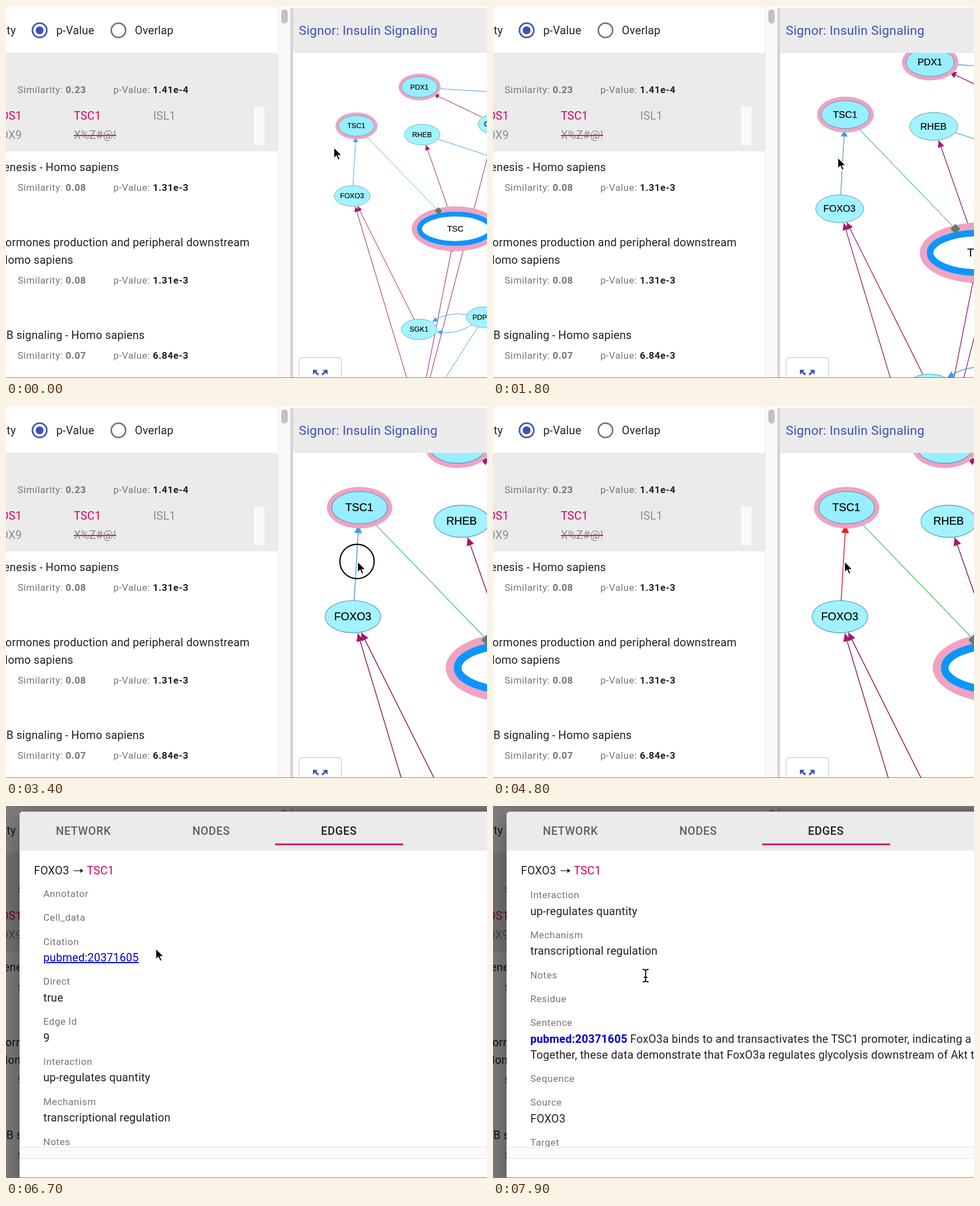
Animation of 851x658 px, one loop 8000 ms. Source, as an HTML page:

```html
<!DOCTYPE html>
<html lang="en">
<head>
<meta charset="utf-8">
<style>
html, body { margin: 0; width: 100%; height: 100%; overflow: hidden; background: #fff; }
svg { display: block; width: 851px; height: 658px; }
text { font: 19.78px Roboto, sans-serif; letter-spacing: .01071em; fill: #212121; white-space: pre; }
.end { text-anchor: end; }
.small { font-size: 16.95px; letter-spacing: .0333em; fill: #757575; }
.small tspan { font-weight: 700; }
.dark { fill: #212121; }
.head { font-size: 22.6px; letter-spacing: .00938em; fill: #3f51b5; }
.pink { fill: #d90057; }
.grey { fill: #8c8c8c; }
.link { fill: #0000cd; text-decoration: underline; }
.bold { fill: #0000cd; font-weight: 700; }
.tab { font-weight: 500; letter-spacing: .02857em; text-anchor: middle; fill: #5f5f5f; }
.on { fill: #212121; }
#graph text { font: 12.5px "Liberation Sans", Arial, sans-serif; letter-spacing: 0; text-anchor: middle; fill: #000; stroke: #000; stroke-width: .15; }
#graph .big { font-size: 14.5px; }
</style>
</head>
<body>
<svg viewBox="0 0 851 658">
  <defs>
    <clipPath id="view"><rect x="508" y="83" width="343" height="575"/></clipPath>
    <clipPath id="page"><rect x="24" y="145" width="827" height="458"/></clipPath>
    <path id="beamPath" d="M-4.5 -11Q0 -11 0 -8V8Q0 11 -4.5 11M4.5 -11Q0 -11 0 -8M0 8Q0 11 4.5 11M-2.5 3H2.5"/>
  </defs>
  <g id="panel"></g>
  <g clip-path="url(#view)"><g id="graph"></g></g>
  <g id="button">
    <rect x="518.5" y="622" width="75" height="60" rx="5" fill="#fff" stroke="#d0d0d0" stroke-width="1.4"/>
    <path fill="#3f51b5" d="M543 643.5h8.5l-2.8 2.8 5 5-2.2 2.2-5-5-3.5 3.5zM569 643.5h-8.5l2.8 2.8-5 5 2.2 2.2 5-5 3.5 3.5z"/>
  </g>
  <g id="dialog">
    <rect width="851" height="658" opacity=".5"/>
    <rect x="24" y="10" width="900" height="800" rx="5.6" fill="#fff" style="filter:drop-shadow(0 13px 24px rgba(0,0,0,.4))"/>
    <path d="M24 79V15.6a5.6 5.6 0 0 1 5.6-5.6H851V79z" fill="#ebebeb"/>
    <rect x="476" y="66.4" width="226.5" height="2.9" fill="#d90057"/>
    <path d="M24 603h827v20.5H24z" fill="#fafafa"/>
    <path d="M24 603.5h827M24 623.5h827" stroke="#e0e0e0"/>
    <path d="M119.5 114.5H133" stroke="#212121" stroke-width="1.3"/>
    <path d="M131.5 110.5l5.5 4-5.5 4z" fill="#212121"/>
    <g id="tabs"></g>
    <g clip-path="url(#page)"><g id="fields"></g></g>
  </g>
  <path d="M0 657.5H851" stroke="#808080"/>
  <circle id="ring" cx="621" cy="275" r="30.3" fill="none" stroke="#000" stroke-width="2.2"/>
  <g id="cursor">
    <path id="arrow" transform="scale(1.12)" d="M0 0V17.5L4 13.7 6.8 20 9.7 18.7 7 12.6H12.5Z" stroke="#fff" stroke-width="1.3"/>
    <g id="beam" fill="none" stroke-linecap="round">
      <use href="#beamPath" stroke="#fff" stroke-width="4"/>
      <use href="#beamPath" stroke="#000" stroke-width="1.8"/>
    </g>
  </g>
</svg>
<script>
const $ = id => document.getElementById(id);
const text = (x, y, s, cls = '') => `<text x="${x}" y="${y}" class="${cls}">${s}</text>`;
const rect = (x, y, w, h, fill, rx = 0) =>
  `<rect x="${x}" y="${y}" width="${w}" height="${h}" fill="${fill}" rx="${rx}"/>`;
const radio = (x, color) =>
  `<circle cx="${x}" cy="43" r="12.7" fill="none" stroke="${color}" stroke-width="2.8"/>`;
const scores = (y, similarity, p) =>
  text(20.5, y, `Similarity: <tspan>${similarity}</tspan>`, 'small') +
  text(190, y, `p-Value: <tspan class="dark">${p}</tspan>`, 'small');

$('panel').innerHTML =
  rect(0, 0, 851, 4, '#fafafa') + rect(0, 83, 482, 174, '#ebebeb') +
  rect(439, 178, 18.5, 68, '#fafafa') +
  rect(481.5, 0, 22, 658, '#fafafa') + rect(481.5, 0, 1, 658, '#e6e6e6') +
  rect(487, 6, 11.5, 25, '#c1c1c1', 5.7) +
  rect(503, 4, 5, 654, '#d4d4d4') + rect(508, 4, 343, 79, '#ebebeb') +
  radio(59.5, '#3f51b5') + '<circle cx="59.5" cy="43" r="7" fill="#3f51b5"/>' + radio(199, '#757575') +
  text(17.5, 50, 'Similarity', 'end') + text(89, 50, 'p-Value') + text(228, 50, 'Overlap') +
  text(518, 51, 'Signor: Insulin Signaling', 'head') +
  scores(153.5, '0.23', '1.41e-4') +
  text(28, 201, 'NOS1', 'end pink') + text(120, 201, 'TSC1', 'pink') + text(260.5, 201, 'ISL1', 'grey') +
  text(28, 235, 'SOX9', 'end grey') + text(120, 235, 'X%Z#@!', 'grey') + rect(120, 228, 75, 2, '#e0281e') +
  text(200, 291.5, 'genesis - Homo sapiens', 'end') + scores(326.5, '0.08', '1.31e-3') +
  text(431, 424.5, 'hormones production and peripheral downstream', 'end') +
  text(119, 455.5, '- Homo sapiens', 'end') + scores(490.5, '0.08', '1.31e-3') +
  text(245.5, 588.5, 'B signaling - Homo sapiens', 'end') + scores(623.5, '0.07', '6.84e-3');

// Network
const PURPLE = '#8d1d68', BLUE = '#4a9fe8';
const head = (x, y, angle, color) =>
  `<path d="M0 0L-9 -4.4V4.4z" fill="${color}" transform="translate(${x} ${y}) rotate(${angle})"/>`;
const line = (x1, y1, x2, y2, color) =>
  `<path d="M${x1} ${y1}L${x2} ${y2}" stroke="${color}"/>`;
const arrow = (x1, y1, x2, y2, color = PURPLE, tip = '#a3176f') =>
  line(x1, y1, x2, y2, color) + head(x2, y2, Math.atan2(y2 - y1, x2 - x1) * 180 / Math.PI, tip);
const curve = (d, x, y, angle) =>
  `<path d="${d}" fill="none" stroke="${BLUE}"/>` + head(x, y, angle, '#3d9cf2');
const ellipse = (x, y, rx, ry, fill, stroke = 'none', w = 0) =>
  `<ellipse cx="${x}" cy="${y}" rx="${rx}" ry="${ry}" fill="${fill}" stroke="${stroke}" stroke-width="${w}"/>`;
const node = (x, y, name, marked) =>
  (marked ? ellipse(x, y, 37.2, 23.7, '#eea3c2') : '') +
  ellipse(x, y, 31.6, 18.3, marked ? '#96eeff' : '#a2f3ff', '#4f93ae', .7) + text(x - .3, y + 4.2, name);

$('graph').innerHTML =
  `<g id="picked">${arrow(613.8, 318, 618.9, 231.8, BLUE, '#3d9cf2')}</g>` +
  `<g id="red">${arrow(613.8, 318, 618.9, 231.8, '#e0282c', '#f5141c')}</g>` +
  line(636, 229, 764.5, 362, '#5bcb80') +
  line(764, 146, 860, 152, BLUE) + line(764, 235.5, 860, 267, BLUE) + line(836, 566, 776, 660, BLUE) +
  line(872, 190, 749.5, 660, PURPLE) +
  arrow(841, 196, 757, 156) + arrow(785, 366, 743, 246) + arrow(743, 660, 789.5, 425) +
  arrow(722, 554, 622, 354) + arrow(710, 661, 618, 355) +
  curve('M816 546Q784 540 758 556', 754, 558.5, 150) +
  curve('M824 564Q798 581 768 577.5', 762.5, 576.5, 186) +
  ellipse(795, 394, 77, 39.7, '#eea3c2') + ellipse(795, 394, 63.4, 26, '#fff', '#0b96ff', 8.7) +
  text(795, 399, 'TSC', 'big') +
  '<path d="M765 356l6.5 6.5-6.5 6.5-6.5-6.5z" fill="#5c806c"/>' +
  node(620, 212, 'TSC1', 1) + node(731.7, 143.3, 'PDX1', 1) + node(736.3, 227.5, 'RHEB') +
  node(612.5, 336, 'FOXO3') + node(731, 572, 'SGK1') + node(846, 550.5, 'PDPK1') + node(867, 209, 'GSK3B');

// Dialog
$('tabs').innerHTML =
  text(137, 51, 'NETWORK', 'tab') + text(363, 51, 'NODES', 'tab') + text(589, 51, 'EDGES', 'tab on') +
  text(49.5, 121, 'FOXO3') + text(143, 121, 'TSC1', 'pink');

const fields = [
  ['Annotator'], ['Cell_data'], ['Citation', 'pubmed:20371605'], ['Direct', 'true'], ['Edge Id', '9'],
  ['Interaction', 'up-regulates quantity'], ['Mechanism', 'transcriptional regulation'],
  ['Notes'], ['Residue'],
  ['Sentence',
    '<tspan class="bold">pubmed:20371605</tspan> FoxO3a binds to and transactivates the TSC1 promoter, indicating a ',
    'Together, these data demonstrate that FoxO3a regulates glycolysis downstream of Akt through'],
  ['Sequence'], ['Source', 'FOXO3'], ['Target', 'TSC1']
];
let fieldY = 183.3, rows = '';
for (const [label, ...values] of fields) {
  rows += text(66, fieldY, label, 'small');
  values.forEach((value, i) => {
    fieldY += i ? 28.3 : 29.4;
    rows += text(66, fieldY, value, label === 'Citation' ? 'link' : '');
  });
  fieldY += values.length ? 41.4 : 42.2;
}
$('fields').innerHTML = rows;

// Motion
const clamp = v => Math.min(1, Math.max(0, v));
const smooth = u => u * u * (3 - 2 * u);
function along(keys, t, ease = u => u) {
  let i = 0;
  while (i < keys.length - 2 && t >= keys[i + 1][0]) i++;
  const a = keys[i], b = keys[i + 1], u = ease(clamp((t - a[0]) / (b[0] - a[0])));
  return a.slice(1).map((v, k) => v + (b[k + 1] - v) * u);
}
const pointer = [
  [100, 580, 250], [600, 610, 268], [2700, 610, 268], [3200, 622, 275], [4950, 622, 275],
  [5800, 217, 163], [5900, 217, 163], [6500, 265, 252], [6800, 265, 252], [7500, 270, 300]
];
const scroll = [[6400, 0], [6700, 22], [7600, 100], [7900, 317]];
const show = (id, on) => $(id).style.display = on ? '' : 'none';

function draw() {
  const t = performance.now() % 8000;
  const zoom = Math.exp(.442 * (1 - (1 - clamp((t - 900) / 1800)) ** 1.585));
  $('graph').setAttribute('transform', `translate(610 270) scale(${zoom}) translate(-610 -270)`);
  show('picked', t < 4800);
  show('red', t >= 4800);
  show('ring', t >= 3400 && t < 3900);
  $('ring').style.opacity = 1 - clamp((t - 3500) / 400);
  show('dialog', t >= 4980);
  $('dialog').style.opacity = smooth(clamp((t - 4950) / 300));
  $('fields').setAttribute('transform', `translate(0 ${-along(scroll, t)[0]})`);
  $('cursor').setAttribute('transform', `translate(${along(pointer, t, smooth)})`);
  show('arrow', t < 7700);
  show('beam', t >= 7700);
  requestAnimationFrame(draw);
}
draw();
</script>
</body>
</html>
```
